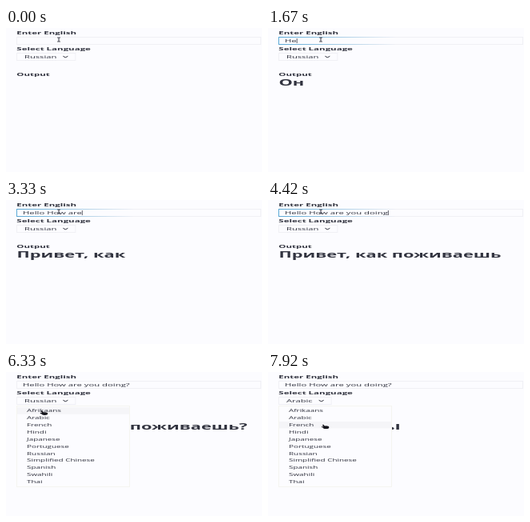
Animation, 320 px wide and 180 px high, one loop 8000 ms. Source, as an HTML page with a canvas:

```html
<!DOCTYPE html>
<html lang="en">
<head>
<meta charset="utf-8">
<title>Live translation form</title>
<style>
html, body { margin: 0; width: 100%; height: 100%; overflow: hidden; background: #fcfcff; }
canvas { display: block; width: 100vw; height: 100vh; }
</style>
</head>
<body>
<canvas width="320" height="180"></canvas>
<script>
const LOOP = 8000, FOCUS = 130, TYPE_START = 1250, TYPE_TIME = 3270;
const MOVE_START = 5330, MOVE_EVERY = 720, MOVE_TIME = 420;
const OPEN = 5830, PICK = MOVE_START + 2 * MOVE_EVERY, REOPEN = PICK + MOVE_EVERY;
const SQUASH = 0.45; // the page is shown wider than its natural shape
const INK = '#31333f', PALE = '#f0f0f5', PAPER = '#fcfcff';
const FONT = '"Open Sans", "Noto Sans", "DejaVu Sans", sans-serif';
const ctx = document.querySelector('canvas').getContext('2d');

const LANGUAGES = ['Afrikaans', 'Arabic', 'French', 'Hindi', 'Japanese', 'Portuguese',
  'Russian', 'Simplified Chinese', 'Spanish', 'Swahili', 'Thai'];
const PHRASE = 'Hello How are you doing?';
const ARABIC = 'اهلا كيف الحال؟';
// Typed beginning and its translation
const RUSSIAN = [['', ''], ['He', 'Он'], ['Hello', 'Привет'], ['Hello How', 'Привет, как'],
  ['Hello How are you', 'Привет, как дела'], ['Hello How are you doing', 'Привет, как поживаешь'],
  [PHRASE, 'Привет, как поживаешь?']];
// The pointer rests at each stop in turn
const STOPS = [[66, 15], [61, 36], [42, 56], [74, 40], [71, 68]];

const between = (t, a, b) => t >= a && t < b;
const clamp = u => Math.min(1, Math.max(0, u));
const smooth = u => u * u * (3 - 2 * u);

function typedAt(t) {
  const u = clamp((t - TYPE_START) / TYPE_TIME);
  return PHRASE.slice(0, Math.floor(PHRASE.length * u ** 1.2));
}

function pointerAt(t) {
  const move = i => smooth(clamp((t - MOVE_START - i * MOVE_EVERY) / MOVE_TIME));
  return STOPS.reduce((p, stop, i) => p.map((v, k) => v + (stop[k] - v) * move(i - 1)));
}

// Draws text and returns its right edge
function text(str, x, y, size, weight = 400) {
  ctx.save();
  ctx.translate(x, y);
  ctx.scale(1, SQUASH);
  ctx.font = `${weight} ${size}px ${FONT}`;
  ctx.fillStyle = INK;
  ctx.fillText(str, 0, 0);
  const end = x + ctx.measureText(str).width;
  ctx.restore();
  return end;
}

function line(points, color, width = 1) {
  ctx.beginPath();
  points.forEach(([x, y]) => ctx.lineTo(x, y));
  ctx.strokeStyle = color;
  ctx.lineWidth = width;
  ctx.stroke();
}

function box(x, y, w, h, stroke) {
  ctx.strokeStyle = stroke;
  ctx.lineWidth = 1;
  ctx.strokeRect(x + 0.5, y + 0.5, w - 1, h - 1);
}

function drawInput(t, typed) {
  const focused = between(t, FOCUS, OPEN);
  const border = ctx.createLinearGradient(13, 0, 160, 0);
  border.addColorStop(0, focused ? '#5aa8d6' : PALE);
  border.addColorStop(1, PALE);
  box(13, 11, 306, 10, border);
  const end = text(typed, 21, 18.3, 11.3);
  const typing = typed && typed !== PHRASE;
  if (focused && (typing || (t + 90) % 1060 < 530)) {
    line([[end + 0.5, 13], [end + 0.5, 19]], INK, 0.8);
  }
}

function drawSelect(language) {
  const end = text(language, 23, 38.3, 11.2);
  box(13, 31, end + 11, 10, PALE);
  line([[end + 8, 35.3], [end + 11, 36.8], [end + 14, 35.3]], INK);
}

function drawMenu(y) {
  ctx.fillStyle = PAPER;
  ctx.fillRect(13, 42, 142, 102);
  box(13, 42, 142, 102, '#f5f5f0');
  const hover = Math.floor((y - 44) / 8.87);
  LANGUAGES.forEach((name, i) => {
    const base = 50.3 + i * 8.87;
    if (i === hover) {
      ctx.fillStyle = '#f5f5f8';
      ctx.fillRect(14, base - 6.2, 140, 8.6);
    }
    text(name, 26, base, 9.9);
  });
}

function drawBeam(x, y) {
  line([[x - 2, y - 3], [x + 2, y - 3]], INK, 0.8);
  line([[x, y - 3], [x, y + 2]], INK);
  line([[x - 2, y + 2], [x + 2, y + 2]], INK, 0.8);
}

function drawHand(x, y) {
  ctx.beginPath();
  ctx.ellipse(x + 1.5, y + 1.2, 3.8, 1.9, 0, 0, 7);
  ctx.fillStyle = '#15151c';
  ctx.fill();
  line([[x - 2.5, y - 2], [x, y + 1]], '#15151c', 1.6);
  line([[x - 4, y + 0.5], [x, y + 1.5]], '#15151c', 1.2);
}

function draw(now) {
  const t = now % LOOP;
  const [x, y] = pointerAt(t);
  const typed = typedAt(t);
  const picked = t >= PICK;
  const russian = RUSSIAN.filter(([start]) => typed.startsWith(start)).pop()[1];

  ctx.fillStyle = PAPER;
  ctx.fillRect(0, 0, 320, 180);
  text('Enter English', 13.3, 8.3, 11.5, 700);
  drawInput(t, typed);
  text('Select Language', 13.3, 28.3, 11.5, 700);
  drawSelect(picked ? 'Arabic' : 'Russian');
  text('Output', 13.3, 59.8, 11.5, 700);
  text(picked ? ARABIC : russian, 13.5, 72.2, picked ? 19.6 : 21.8, 700);
  if (between(t, OPEN, PICK) || t >= REOPEN) drawMenu(y);
  (y < 22 ? drawBeam : drawHand)(x, y);
  requestAnimationFrame(draw);
}
requestAnimationFrame(draw);
</script>
</body>
</html>
```
